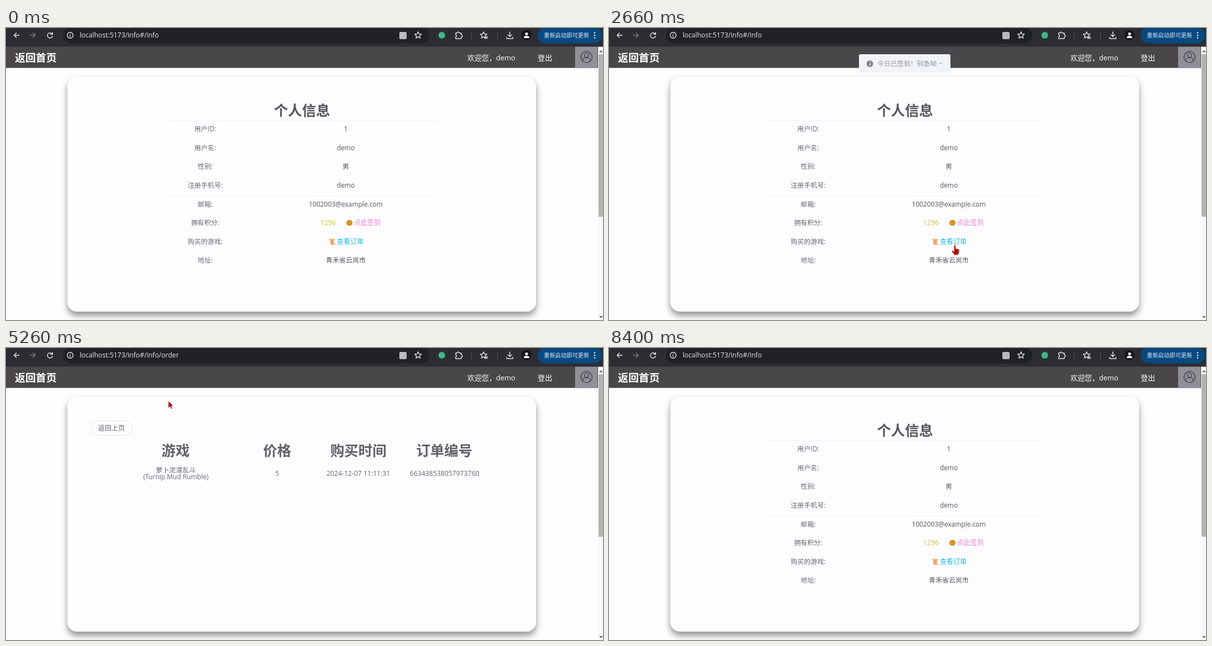
Write an HTML page that moves like this. It is 1070 by 523 pixels and loops after 8530 ms.

```html
<!DOCTYPE html>
<html lang="zh-CN">
<head>
<meta charset="utf-8">
<title>个人信息</title>
<style>
  html, body { margin: 0; width: 100%; height: 100%; overflow: hidden; background: #fdfdff; }
  svg { display: block; width: 100%; height: 100%; }
  text { font-family: "Open Sans", "Noto Sans CJK SC", "Noto Sans CJK", sans-serif; white-space: pre; }
  .card { filter: drop-shadow(0 7px 6px rgba(0, 0, 0, .42)); }
  .line { fill: none; stroke: #e4e4e8; stroke-width: 1.4; stroke-linecap: round; stroke-linejoin: round; }
</style>
</head>
<body>
<svg id="stage" viewBox="0 0 1070 523">
  <rect width="1070" height="523" fill="#fdfdff"/>
  <rect class="card" x="110" y="87" width="840" height="421" rx="17" fill="#fdfdff"/>

  <g id="info">
    <path d="M285 166H774M280 300.5H774" stroke="#f2f2f8"/>
    <circle cx="615.5" cy="349" r="5.6" fill="#e3a032"/>
    <circle cx="615.5" cy="349" r="3.6" fill="none" stroke="#b97a1c" stroke-width=".9"/>
    <path d="M615.5 347v4" stroke="#b97a1c"/>
    <path d="M580 377.5h8q2 0 2 2h-2v7h3q0 2-2 2h-6q-2 0-2-2v-6q-2 0-2-1.5z" fill="#f3b877"/>
    <path d="M583 381h4M583 383.5h4M583 386h3" stroke="#c98243" stroke-width=".8"/>
  </g>

  <g id="order">
    <rect x="152.5" y="130.5" width="74" height="26" rx="13" fill="#fdfdff" stroke="#e3e4ee"/>
  </g>

  <g id="header">
    <rect y="33" width="1061" height="38.5" fill="#4a474a"/>
    <rect x="1020" y="33" width="40" height="38.5" fill="#918f98"/>
    <g fill="none" stroke="#35353d" stroke-width="1.2">
      <circle cx="1040.5" cy="52" r="10"/>
      <circle cx="1040.5" cy="48.8" r="3.8"/>
      <path d="M1033.5 59c1-8 13-8 14 0"/>
    </g>
  </g>

  <g id="scroll">
    <rect x="1061" y="33" width="9" height="490" fill="#f7f7f8"/>
    <rect x="1062" y="47" width="8" height="291" fill="#b3b3b1"/>
    <path d="M1063 43.5l3.5-4 3.5 4zM1063 516l3.5 4 3.5-4z" fill="#77777c"/>
  </g>

  <g id="toast">
    <rect x="448" y="47" width="164" height="33" rx="3" fill="#f1f3fb"/>
    <circle cx="467.5" cy="64" r="6" fill="#85868c"/>
    <path d="M468 60.3v1.3M468 63.2l-.8 4.3" stroke="#f4f4f6" stroke-width="1.5"/>
  </g>

  <g id="browser">
    <rect width="1070" height="33.5" fill="#2d2d31"/>
    <rect x="102" y="-1" width="657" height="28.5" rx="14" fill="#202126"/>
    <g class="line">
      <path d="M23.5 13H14.5M18.5 9l-4 4 4 4"/>
      <path d="M43.5 13h9M48.5 9l4 4-4 4" stroke="#77777d"/>
      <path d="M82.5 10.5a4.6 4.6 0 1 0 .8 4M83.5 8v3.2h-3.2"/>
      <circle cx="115" cy="13" r="5.3"/>
      <path d="M115 12.8v2.7M115 10.3v.2"/>
      <path d="M806 9h2.5a1.8 1.8 0 0 1 3.6 0h3.9v3.4a1.8 1.8 0 0 1 0 3.6v3h-10v-3.2a1.7 1.7 0 0 0 0-3.4z"/>
      <path d="M903 7v8M899.5 12l3.5 3.5 3.5-3.5M897.5 16.5v2.5h11v-2.5"/>
      <path d="M834 8v11M881 8v11" stroke="#5a5a62" stroke-width="1"/>
      <path class="star"/>
      <path class="star"/>
      <path d="M858 18.5h5M860 16h3"/>
    </g>
    <rect x="705" y="7" width="13" height="13" rx="2" fill="#b9bac0"/>
    <circle cx="781" cy="13" r="6" fill="#3fb58a"/>
    <circle cx="933" cy="13" r="9" fill="#15161f"/>
    <circle cx="933" cy="10.5" r="2.6" fill="#fff"/>
    <path d="M928 18q0-4 5-4t5 4z" fill="#fff"/>
    <rect x="953" y="-1" width="115" height="28.5" rx="14" fill="#084a80"/>
    <g fill="#dcecff"><circle cx="1055" cy="8.5" r="1.3"/><circle cx="1055" cy="13" r="1.3"/><circle cx="1055" cy="17.5" r="1.3"/></g>
  </g>

  <g id="orderTip"><path d="M0 507H159q4 0 4 4V523H0z" fill="#2a2b2e"/></g>
  <g id="infoTip"><path d="M0 507H128q4 0 4 4V523H0z" fill="#2a2b2e"/></g>

  <g id="cursor">
    <path id="arrow" d="M0 0V12.5L2.9 9.8 5 14.3 7 13.4 5 9H8.8z" fill="#b00808" stroke="#fff" stroke-width=".5"/>
    <path id="hand" d="M-1.5.5Q0-1.5 1.4.5V6l5 1.2Q8 7.8 7.8 9.5L7 14 5.5 17.5H-1L-5.5 11.5Q-6.5 9.5-4.5 9.4L-1.5 11.5z" fill="#b00808" stroke="#fff" stroke-width=".5"/>
  </g>
</svg>
<script>
const LOOP = 8530;
const start = document.timeline.currentTime || 0;
const $ = id => document.getElementById(id);

// y is the visual middle of the line
function text(parent, str, x, y, size, fill, opt = {}) {
  const el = document.createElementNS("http://www.w3.org/2000/svg", "text");
  el.textContent = str;
  const attrs = {
    x, y: y + size * 0.36, "font-size": size, fill,
    "text-anchor": opt.left ? "start" : "middle",
    "font-weight": opt.bold ? 700 : 400
  };
  for (const k in attrs) el.setAttribute(k, attrs[k]);
  $(parent).append(el);
  return el;
}

function star(cx, cy, r) {
  let d = "";
  for (let i = 0; i < 10; i++) {
    const a = i * Math.PI / 5 - Math.PI / 2, q = i % 2 ? r * 0.46 : r;
    d += (i ? "L" : "M") + (cx + q * Math.cos(a)).toFixed(2) + " " + (cy + q * Math.sin(a)).toFixed(2);
  }
  return d + "z";
}
document.querySelectorAll(".star").forEach((p, i) => p.setAttribute("d", star(i ? 856 : 738.5, 13, 6.3)));

const LEFT = { left: true }, BOLD = { bold: true };
const GREY = "#66666f", DARK = "#56565d";

// Profile page
text("info", "个人信息", 530.5, 148, 25.2, DARK, BOLD);
[
  ["用户ID:", "1"],
  ["用户名:", "demo"],
  ["性别:", "男"],
  ["注册手机号:", "demo"],
  ["邮箱:", "1002003@example.com"],
  ["拥有积分:"],
  ["购买的游戏:"],
  ["地址:", "青禾省云岚市"]
].forEach(([label, value], i) => {
  const y = 181 + i * 33.6;
  text("info", label, 357, y, 11.9, GREY);
  if (value) text("info", value, 609, y, 11.9, "#55555c");
});
text("info", "1296", 563, 349, 12.2, "#d2c435", LEFT);
text("info", "点此签到", 623.5, 349, 12, "#ee7fd2", LEFT);
text("info", "查看订单", 593, 383, 12, "#22b9df", LEFT);

// Order page
text("order", "返回上页", 189, 144, 12, GREY);
[["游戏", 304], ["价格", 486], ["购买时间", 631.5], ["订单编号", 785.5]]
  .forEach(([s, x]) => text("order", s, x, 184, 25.2, "#606068", BOLD));
text("order", "萝卜泥潭乱斗", 304.5, 219, 11.9, GREY);
text("order", "(Turnip Mud Rumble)", 304.5, 231, 11.9, GREY);
text("order", "5", 486, 225, 12.1, GREY);
text("order", "2024-12-07 11:11:31", 631.5, 225, 12.1, GREY);
text("order", "663438538057973760", 786, 225, 12.1, GREY);

// Site header, toast, browser bar
text("header", "返回首页", 16, 53, 18.7, "#fff", { left: true, bold: true });
text("header", "欢迎您，demo", 827, 53, 12.8, "#fff", LEFT);
text("header", "登出", 953, 53, 12.9, "#fff", LEFT);
text("toast", "今日已签到！别急呦 ~", 481, 64, 11.8, "#929399", LEFT);
text("browser", "重新启动即可更新", 964, 13.5, 10.2, "#d6e8ff", LEFT);
const url = "localhost:5173/info#/info";
const infoUrl = text("browser", url, 132, 13, 12.1, "#e6e6ea", LEFT);
const orderUrl = text("browser", url + "/order", 132, 13, 12.1, "#e6e6ea", LEFT);
text("infoTip", url, 4, 517, 10.4, "#dededf", LEFT);
text("orderTip", url + "/order", 4, 517, 10.4, "#dededf", LEFT);

// steps: [ms, css, easing to the next step]; the ends are held
function play(el, steps) {
  const first = steps[0], last = steps[steps.length - 1];
  const list = [...steps, [LOOP, last[1]]];
  if (first[0] > 0) list.unshift([0, first[1]]);
  const frames = list.map(([ms, css, easing = "linear"]) => ({ offset: ms / LOOP, easing, ...css }));
  el.animate(frames, { duration: LOOP, iterations: Infinity }).startTime = start;
}
const fade = (el, steps) => play(el, steps.map(([ms, opacity, easing]) => [ms, { opacity }, easing]));

// Starts shown or hidden and flips at each given time
function toggle(el, shown, times) {
  fade(el, [0, ...times].map((ms, i) => [ms, Number(shown === (i % 2 === 0)), "step-end"]));
}

const OPEN = 3400, BACK = 6260;
for (const el of [$("order"), orderUrl]) toggle(el, false, [OPEN, BACK]);
for (const el of [$("info"), infoUrl]) toggle(el, true, [OPEN, BACK]);

const hovers = [1590, 2150, 2650, OPEN, 6060, BACK];
toggle($("hand"), false, hovers);
toggle($("arrow"), true, hovers);

fade($("orderTip"), [[2850, 0], [2970, 1], [3700, 1], [3900, 0]]);
fade($("infoTip"), [[6130, 0], [6200, 1], [6510, 1], [6710, 0]]);

const at = (x, y) => ({ transform: `translate(${x}px, ${y}px)` });
const SMOOTH = "ease-in-out";

fade($("toast"), [[1570, 0, "ease"], [1820, 1], [4560, 1, "ease"], [4860, 0]]);
play($("toast"), [
  [1570, at(0, -33), "ease"],
  [1970, at(0, 0)],
  [4560, at(0, 0), "ease"],
  [4960, at(0, -33)]
]);

play($("cursor"), [
  [450, at(730, -25), SMOOTH],
  [1350, at(653, 352)],
  [2150, at(653, 352), SMOOTH],
  [2650, at(620, 389)],
  [3800, at(620, 389), SMOOTH],
  [5000, at(291, 95)],
  [5400, at(291, 95), SMOOTH],
  [6060, at(201, 139)],
  [7000, at(201, 139), SMOOTH],
  [7750, at(330, -25)]
]);
</script>
</body>
</html>
```
